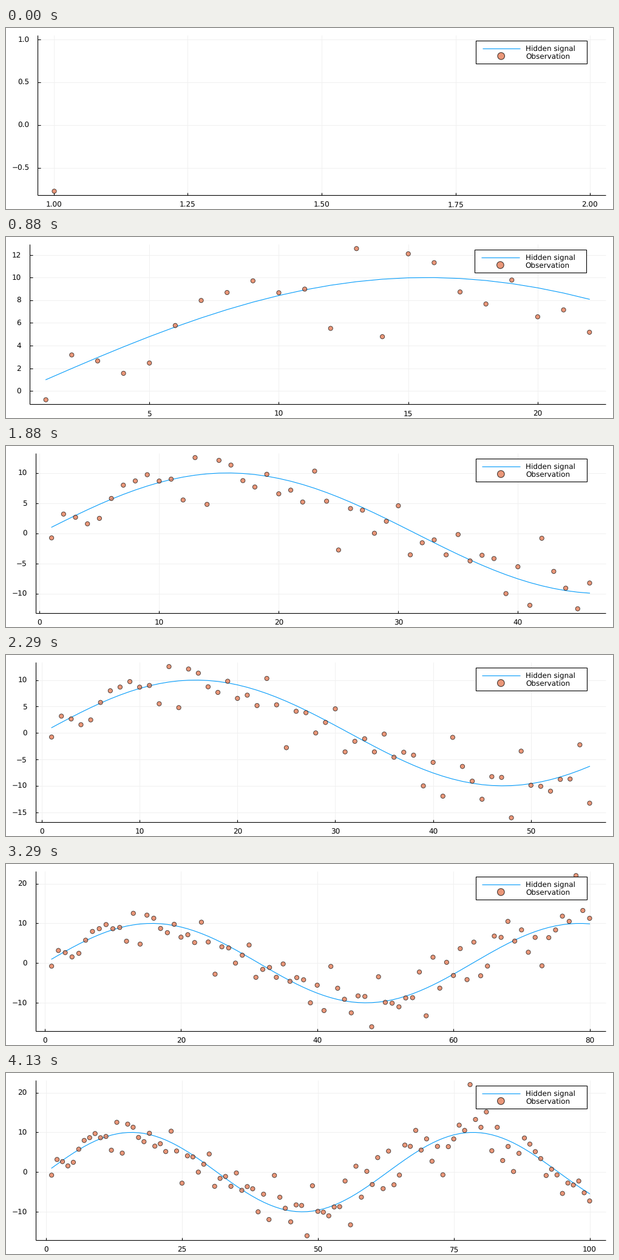
These frames come from a looping animation (1000x300 px, 4.18 s). A matplotlib script:

```python
import math

import numpy as np
import matplotlib.pyplot as plt
from matplotlib.animation import FuncAnimation
from matplotlib.collections import LineCollection
from matplotlib.patches import Circle, Rectangle

W, H, DPI = 1000, 300, 100
PT = 72 / DPI                      # points per pixel
RIGHT, TOP, BOTTOM = 988.1, 11.7, 277.3
FONT = 12
BLUE, ORANGE, GRID = "#009afa", "#e26f46", "#f0f0f0"
FILL, EDGE = (0.886, 0.435, 0.275, 0.72), (0, 0, 0, 0.72)
EM = {"\u2212": 0.838, ".": 0.318}  # other glyphs are digits

plt.rcParams.update({"font.family": "DejaVu Sans", "text.hinting": "none"})

steps = np.arange(1, 101)
signal = 10 * np.sin(0.1 * steps)
observed = np.array([
    -0.77, 3.18, 2.65, 1.56, 2.47, 5.77, 7.98, 8.68, 9.71, 8.66,
    8.98, 5.52, 12.55, 4.79, 12.09, 11.31, 8.73, 7.67, 9.78, 6.54,
    7.15, 5.18, 10.31, 5.32, -2.78, 4.10, 3.83, 0.0, 1.99, 4.56,
    -3.58, -1.58, -1.10, -3.58, -0.21, -4.59, -3.65, -4.20, -10.01, -5.56,
    -11.95, -0.83, -6.33, -9.11, -12.53, -8.26, -8.40, -16.04, -3.44, -9.89,
    -10.09, -11.01, -8.78, -8.71, -2.24, -13.28, 1.49, -6.31, 0.20, -3.12,
    3.66, -4.16, 5.29, -3.19, -0.75, 6.81, 6.49, 10.51, 5.55, 8.37,
    2.74, 6.48, -0.68, 6.42, 8.35, 11.83, 10.51, 22.05, 13.26, 11.29,
    15.16, 5.38, 11.29, 2.92, 6.46, 0.15, 4.73, 8.59, 7.06, 5.16,
    3.41, -0.85, 0.73, -0.71, -5.37, -2.75, -3.24, -2.25, -5.20, -7.27])


def widen(lo, hi):
    if lo == hi:
        hi = lo + 1
    pad = 0.03 * (hi - lo)
    return lo - pad, hi + pad


def nice_ticks(lo, hi, k_min=4, k_max=16, ideal=5):
    """Tick values with the best mix of count, roundness, zero and coverage."""
    span = hi - lo
    best, top = None, -math.inf
    z0 = math.ceil(math.log10(span))
    for z in range(z0, z0 - 3, -1):
        for k in range(k_min, k_max + 1):
            for q, nice in ((1, 1), (5, .9), (2, .7), (2.5, .5), (3, .2)):
                step = q * 10.0 ** z
                full = (k - 1) * step
                if not span <= full < 2 * span:
                    continue
                first = math.ceil((hi - full) / step)
                last = math.floor(lo / step)
                for r in range(first, last + 1):
                    vals = [v * step for v in range(r, r + k)
                            if lo <= v * step <= hi]
                    n = len(vals)
                    if n < k_min:
                        continue
                    count = 1 - abs(n - ideal) / ideal if n < 2 * ideal else 0
                    zero = r <= 0 and -r < k
                    cover = 1.5 * span / ((n - 1) * step)
                    score = count / 4 + zero / 6 + cover / 3 + nice / 4
                    if score > top + 1e-9:
                        best, top = vals, score
    return best


def tick_labels(vals):
    digits = next(d for d in range(4)
                  if all(abs(v - round(v, d)) < 1e-9 for v in vals))
    return [f"{v + 0.0:.{digits}f}".replace("-", "\u2212") for v in vals]


def layout(n):
    """Limits, ticks and left edge of the plot with n points."""
    ys = np.concatenate([signal[:n], observed[:n]])
    xlim, ylim = widen(1, n), widen(ys.min(), ys.max())
    xt, yt = nice_ticks(*xlim), nice_ticks(*ylim)
    ylab = tick_labels(yt)
    wide = max(sum(EM.get(c, 0.636) for c in s) for s in ylab)
    return xlim, ylim, xt, yt, tick_labels(xt), ylab, 24.05 + 11.6 * wide


layouts = [layout(n) for n in steps]

fig = plt.figure(figsize=(W / DPI, H / DPI), dpi=DPI, facecolor="white")
ax = fig.add_axes([0, 0, 1, 1])


def segments(segs, color, width, z):
    ax.add_collection(LineCollection(segs, colors=color, linewidths=width * PT,
                                     zorder=z), autolim=False)


def label(x, y, s, ha, z=3):
    ax.text(x, y + 0.365 * FONT, s, ha=ha, va="baseline",
            fontsize=FONT * PT, color="black", zorder=z)


def legend(left):
    unit = (RIGHT - left) / 45
    x1 = RIGHT - 1.5 * unit
    x0 = x1 - 5 * unit - 78.8
    y0, row = TOP + (BOTTOM - TOP) / 30, 12.97
    ax.add_patch(Rectangle((x0, y0), x1 - x0, 3 * row, fc="white", ec="black",
                           lw=1.1 * PT, zorder=6))
    a, b = x0 + unit / 2, x0 + 3.5 * unit
    segments([[(a, y0 + row), (b, y0 + row)]], BLUE, 1.1, 7)
    ax.add_patch(Circle(((a + b) / 2, y0 + 2 * row), 5.8, fc=FILL, ec=EDGE,
                        lw=1.1 * PT, zorder=7))
    label(x0 + 4 * unit - 1, y0 + row, "Hidden signal", "left", 7)
    label(x0 + 4 * unit - 1, y0 + 2 * row, "Observation", "left", 7)


def draw(i):
    # 24 plots per second on a 10 ms clock
    n = min(100, -(-(24 * i + 12) // 100))
    xlim, ylim, xt, yt, xlab, ylab, left = layouts[n - 1]

    def px(x):
        return left + (x - xlim[0]) / (xlim[1] - xlim[0]) * (RIGHT - left)

    def py(y):
        return BOTTOM - (y - ylim[0]) / (ylim[1] - ylim[0]) * (BOTTOM - TOP)

    ax.clear()
    ax.set_axis_off()
    ax.set(xlim=(0, W), ylim=(H, 0), autoscale_on=False)

    tx, ty = [px(v) for v in xt], [py(v) for v in yt]
    segments([[(x, TOP), (x, BOTTOM)] for x in tx]
             + [[(left, y), (RIGHT, y)] for y in ty], GRID, 1, 1)
    segments([[(x, BOTTOM), (x, BOTTOM - 4.7)] for x in tx]
             + [[(left, y), (left + 4.7, y)] for y in ty]
             + [[(left, TOP), (left, BOTTOM)], [(left, BOTTOM), (RIGHT, BOTTOM)]],
             "black", 1.1, 2)
    for x, s in zip(tx, xlab):
        label(x, 292.3, s, "center")
    for y, s in zip(ty, ylab):
        label(left - 13.8, y, s, "right")

    xs = px(steps[:n])
    if n > 1:
        ax.plot(xs, py(signal[:n]), color=BLUE, lw=1.1 * PT, zorder=4)
    ax.scatter(xs, py(observed[:n]), s=np.full(n, (7.2 * PT) ** 2),
               facecolors=[FILL], edgecolors=[EDGE], linewidths=0.9 * PT,
               zorder=5)
    legend(left)
    return []


anim = FuncAnimation(fig, draw, frames=418, interval=10, init_func=lambda: [],
                     repeat=True, repeat_delay=0, cache_frame_data=False)
plt.show()
```
